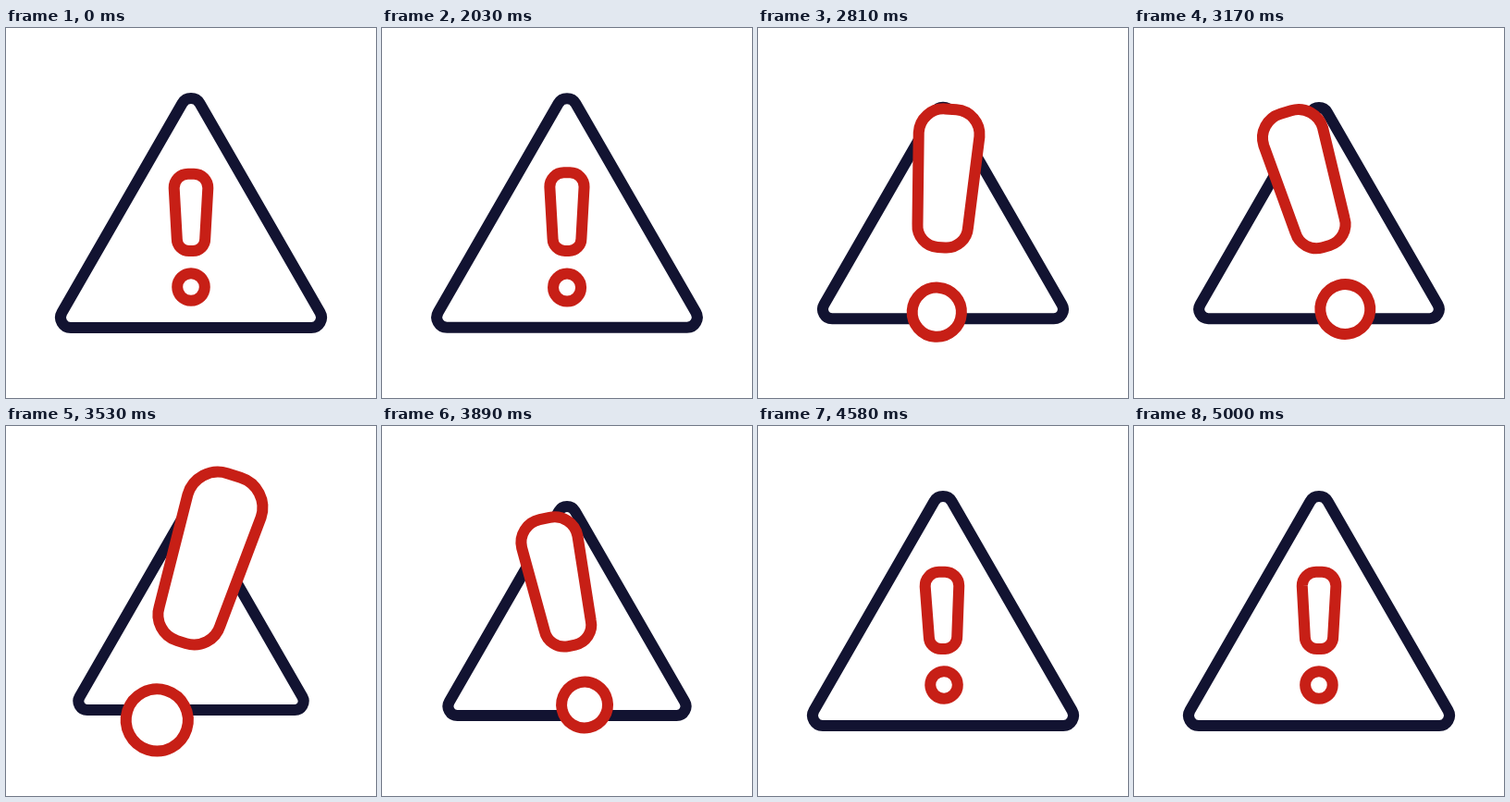
These frames come from a looping animation (400 by 400 pixels, 5.03 s). An HTML page:

```html
<!DOCTYPE html>
<html lang="en">
<head>
<meta charset="utf-8">
<title>Warning sign</title>
<style>
  html, body { margin: 0; width: 100%; height: 100%; overflow: hidden; background: #fff; }
  svg { display: block; width: 100%; height: 100%; }
  path, circle { fill: #fff; stroke-width: 12; vector-effect: non-scaling-stroke; }
  #sign { stroke: #121331; }
  #mark { stroke: #c71f16; }
</style>
</head>
<body>
<svg viewBox="0 0 400 400">
  <g id="sign">
    <path d="M-130 124A11 11 0 0 1-139.5 107.5L-9.5-118.5A11 11 0 0 1 9.5-118.5L139.5 107.5A11 11 0 0 1 130 124Z"/>
  </g>
  <g id="mark">
    <path d="M-3.3-68.3H3.3A15 15 0 0 1 18.3-53L15.2 2A13 13 0 0 1 2.2 15H-2.2A13 13 0 0 1-15.2 2L-18.3-53A15 15 0 0 1-3.3-68.3Z"/>
    <circle cy="54" r="14.8"/>
  </g>
</svg>
<script>
  const LOOP = 5030, START = 2000, STEP = 30;

  const progress = (t, from, to) => Math.min(1, Math.max(0, (t - from) / (to - from)));
  // Smooth rise from 0 to 1, and smooth rise to 1 and back.
  const ramp = (t, from, to) => (1 - Math.cos(Math.PI * progress(t, from, to))) / 2;
  const bump = (t, from, to) => Math.sin(Math.PI * progress(t, from, to)) ** 2;

  // The sign shrinks, breathes once, overshoots and settles.
  const signScale = t => 1 - .137 * ramp(t, START, 2440) + .087 * bump(t, 2525, 3450)
    + .263 * ramp(t, 3765, 4206) - .126 * ramp(t, 4206, 4570);

  // The mark does the opposite.
  const markScale = t => 1 + 1.267 * ramp(t, START, 2420) - .68 * bump(t, 2520, 3450)
    - 1.397 * ramp(t, 3640, 4200) + .13 * ramp(t, 4200, 4600);

  // A swing that builds up and dies away.
  function markAngle(t) {
    const fade = (1 - progress(t, 3150, 5150)) ** 2;
    return 30.5 * ramp(t, START, 2640) * fade * Math.sin(2 * Math.PI * (t - 2405) / 845);
  }

  const sign = document.getElementById('sign');
  const mark = document.getElementById('mark');

  function draw(time) {
    const t = START + Math.floor((time % LOOP - START) / STEP) * STEP;
    const size = markScale(t);
    const y = 226 - 19.6 * Math.abs(size - 1);
    sign.setAttribute('transform', `translate(200 200) scale(${signScale(t)})`);
    mark.setAttribute('transform', `translate(200 ${y}) rotate(${markAngle(t)}) scale(${size})`);
  }

  const begin = performance.now();
  function tick() {
    draw(performance.now() - begin);
    requestAnimationFrame(tick);
  }
  tick();
</script>
</body>
</html>
```
